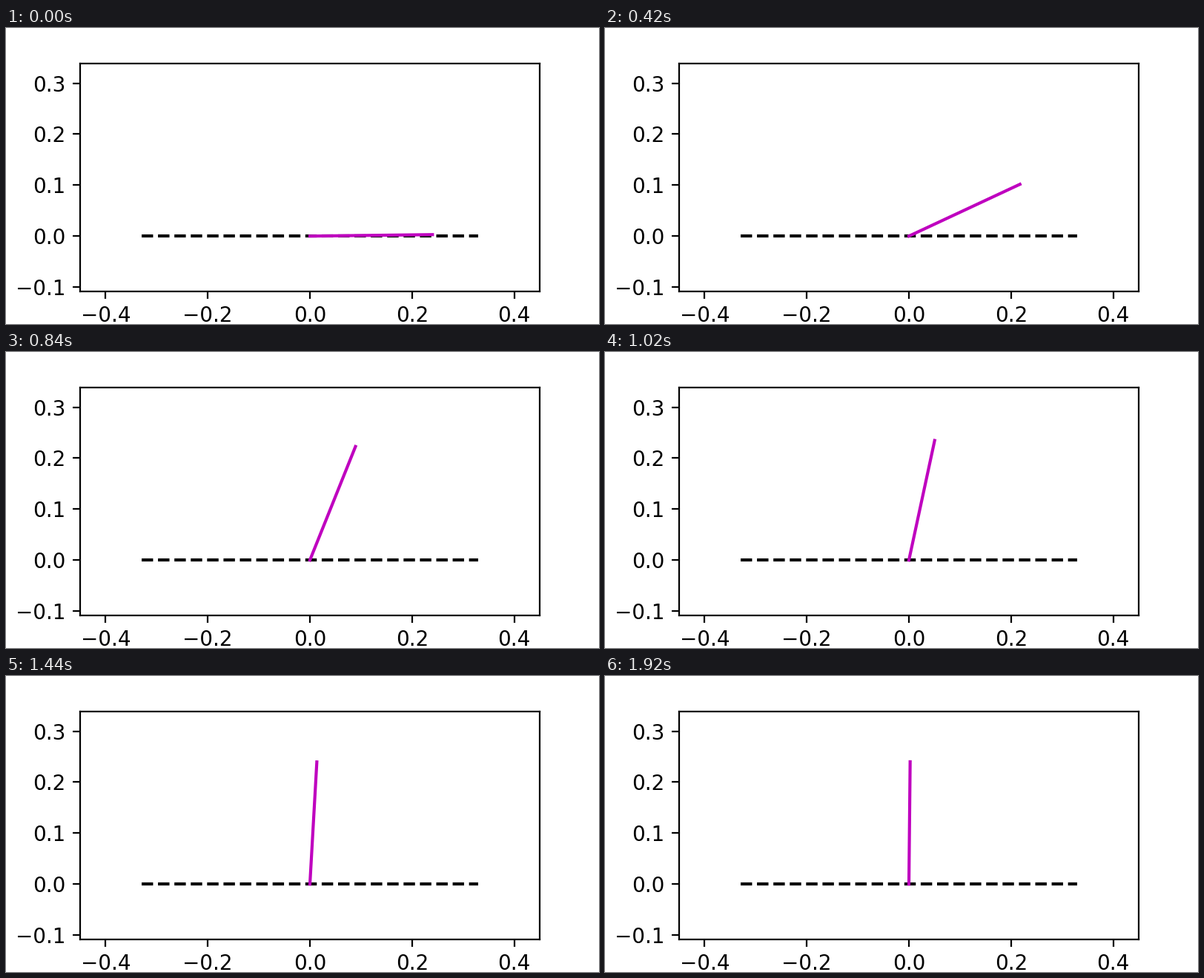
A matplotlib script that plays this animation: 800x400 px, repeating every 1980 ms.

```python
import numpy as np
import matplotlib.pyplot as plt
from matplotlib.animation import FuncAnimation

FRAMES, STEP_MS = 33, 60
ARM, BASE = 0.24, 0.33
ACCEL = 0.01215  # rad per step squared
RAMP_END = 10

# Remaining angle to vertical while the arm settles
SETTLE_T = [10, 14, 18, 21, 27, 32]
SETTLE_GAP = [0.769, 0.381, 0.174, 0.097, 0.033, 0.010]


def angle(k):
    """Constant acceleration, then an exponential approach to vertical."""
    if k < RAMP_END:
        return ACCEL * (k + 1) * (k + 2) / 2
    return np.pi / 2 - np.exp(np.interp(k, SETTLE_T, np.log(SETTLE_GAP)))


plt.rcParams["font.family"] = "DejaVu Sans"
fig, ax = plt.subplots(figsize=(4, 2), dpi=200)
half_height = 0.45 * 308 / 620  # equal scale on both axes
ax.set_xlim(-0.45, 0.45)
ax.set_ylim(0.115 - half_height, 0.115 + half_height)
ax.set_xticks([-0.4, -0.2, 0.0, 0.2, 0.4])
ax.set_yticks([-0.1, 0.0, 0.1, 0.2, 0.3])

ax.plot([-BASE, BASE], [0, 0], "k--")
arm, = ax.plot([], [], "m-")


def draw(k):
    a = angle(k)
    arm.set_data([0, ARM * np.cos(a)], [0, ARM * np.sin(a)])
    return arm,


anim = FuncAnimation(fig, draw, frames=FRAMES, interval=STEP_MS,
                     repeat=True, repeat_delay=0)
plt.show()
```
